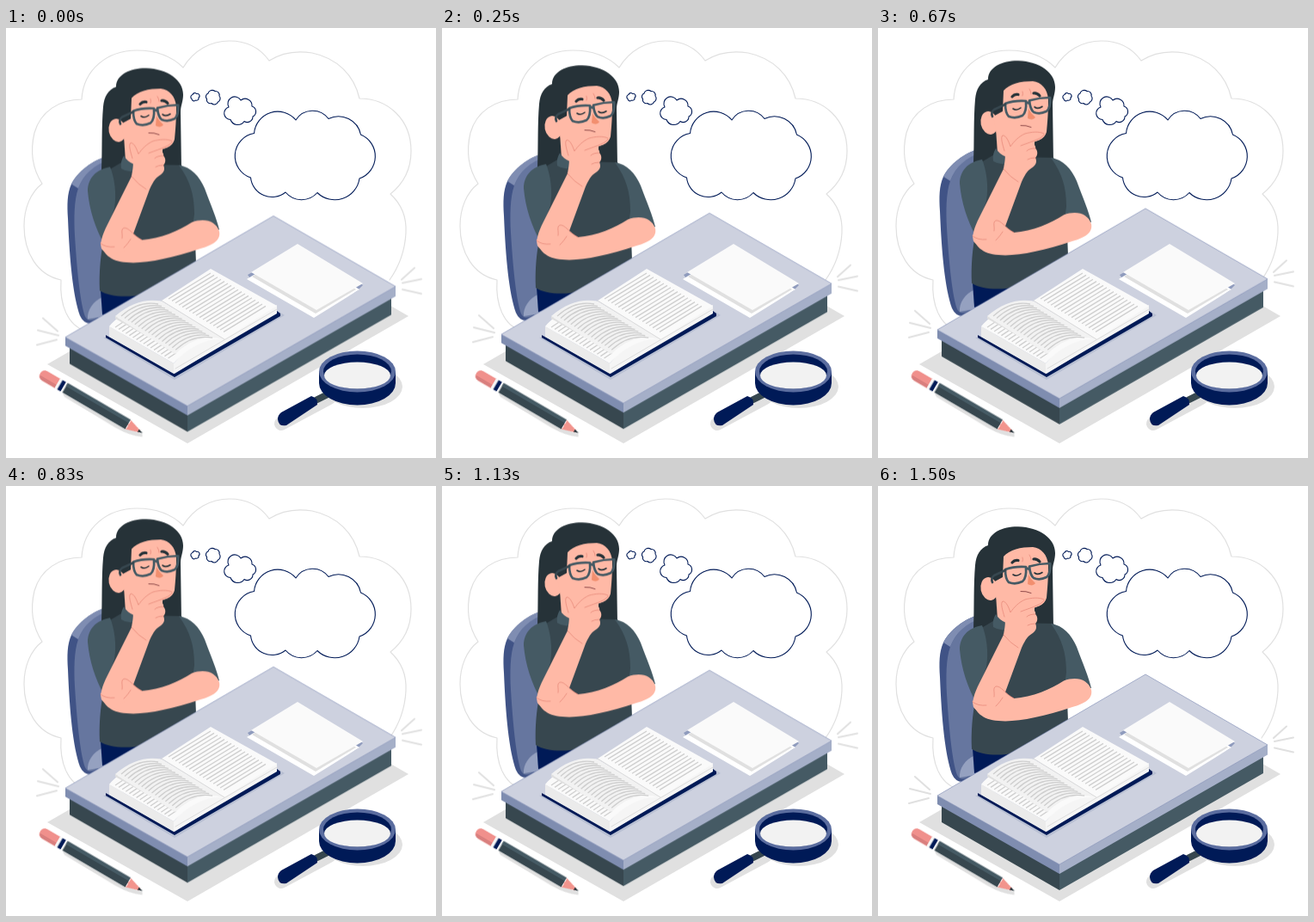
These frames come from a looping animation (500x500 px, 1.54 s). An HTML page:

```html
<!DOCTYPE html>
<html lang="en">
<head>
<meta charset="utf-8">
<title>Thinking at the desk</title>
<style>
  html, body { margin: 0; width: 100%; height: 100%; overflow: hidden; background: #fff; }
  svg { display: block; width: 100%; height: 100%; }
  .float { animation: float 1540ms linear -40ms infinite; }
  @keyframes float {
    50% { transform: translateY(-10px); }
  }
  .line { fill: none; stroke-linecap: round; stroke-linejoin: round; }
  .skin { fill: #ffb9a6; }
  .crease { stroke: #e88b7b; stroke-width: .8; }
  .hair { fill: #263238; }
  .shirt { fill: #37474f; }
  .sleeve { fill: #455a64; }
  .navy { fill: #001a57; }
  .shade { fill: #e0e0e0; }
  .bubble { fill: #fff; stroke: #001a57; stroke-width: 1.1; stroke-linejoin: round; }
  .text { fill: none; stroke: #cfcfcf; stroke-width: 1.3; }
</style>
</head>
<body>
<svg viewBox="0 0 500 500">
  <!-- backdrop -->
  <path class="line" stroke="#e0e0e0" stroke-width="1.2" d="M92 352C72 346 62 322 64 293C36 287 21 261 21 230C21 209 29 191 42 181C31 164 28 143 33 122C40 97 62 83 88 83C90 48 118 26 152 26C174 26 193 33 206 46C218 26 238 15 260 15C280 15 296 24 306 38C320 29 338 26 356 29C385 35 405 55 411 82C445 82 471 107 471 143C471 164 462 181 447 193C460 205 466 220 465 238C464 258 458 276 446 293"/>
  <path class="shade" d="M48 391L211 483L468 335L307 242Z"/>

  <!-- thoughts -->
  <path class="bubble" d="M288.500 122.500A27.500 27.500 0 0 1 337 107A23 23 0 0 1 375 105.500A26.500 26.500 0 0 1 412.500 124A27.300 27.300 0 0 1 411 175A29 29 0 0 1 362 191.500A24.500 24.500 0 0 1 325 191A25 25 0 0 1 284.500 174A26.600 26.600 0 0 1 288.500 122.500Z"/>
  <path class="bubble" d="M259 92A8 8 0 0 1 273 84A8 8 0 0 1 286 91A6.500 6.500 0 0 1 287 103A6.500 6.500 0 0 1 277 108.500A9 9 0 0 1 261 106.500A7.400 7.400 0 0 1 259 92Z"/>
  <path class="bubble" d="M235 76A5 5 0 0 1 243 73.500A4.500 4.500 0 0 1 248 79A4.500 4.500 0 0 1 246.500 86A4.500 4.500 0 0 1 239 87.500A4.200 4.200 0 0 1 233.500 82.500A4 4 0 0 1 235 76Z"/>
  <path class="bubble" d="M217 77.500A2.600 2.600 0 0 1 221.500 76.500A2.600 2.600 0 0 1 224 81A2.600 2.600 0 0 1 220.500 84A2.600 2.600 0 0 1 216 82.500A2.800 2.800 0 0 1 217 77.500Z"/>

  <g class="float">
    <g class="line" stroke="#e0e0e0" stroke-width="2">
      <path d="M43 338L60 353M37 352L61 358M36 369L59 363"/>
      <path d="M475 279.500L460 293M483 292.500L461 297M483 309.500L461 304.500"/>
    </g>

    <!-- chair -->
    <path fill="#405386" d="M120 149C100 154 83 168 76 182C71 193 71 206 72 222C74 272 78 312 86 335Q90 344 98 344L120 330Z"/>
    <path fill="#66769f" d="M120 153C103 159 90 171 84 187C79 201 79 222 80 242C83 290 87 322 92 336Q96 344 105 338L120 330Z"/>
    <path fill="#7f8db2" d="M120 149C100 154 83 168 76 182L84 187C90 171 103 159 120 154Z"/>
    <path fill="#95a1c0" d="M113 313C101 318 94 329 95 339L113 336Z"/>

    <!-- hair and neck -->
    <path class="hair" d="M111 167C112 140 111 115 113 92C114 80 119 72 128 69C128 54 146 47 163 47.300C188 48 206 61 206 78C206 86 203 91 203 98L204 166Z"/>
    <path class="skin" d="M137 126L139 155L158 168L182 150V130Z"/>

    <!-- body -->
    <path class="navy" d="M110 305L112 334L180 315V300Z"/>
    <path class="shirt" d="M134 157Q142 163 152 159L204 160L226 190V224L219 222L221 274L171 303C166 313 126 317 109 306C108 285 110 265 113 250L112 170Z"/>
    <path class="sleeve" d="M121 162C104 165 95 176 95 190C97 213 104 233 114 252L119 231L126 210C129 193 126 174 121 162Z"/>
    <path class="sleeve" d="M201 160C215 162 225 173 231 187C238 206 245 222 248 235L238 236L217 232L219 217C219 194 214 178 201 160Z"/>
    <path class="sleeve" d="M137 149C134 154 133 159 134 164Q140 168 147 167L149 159Q141 156 137 149Z"/>

    <!-- face -->
    <ellipse class="skin" cx="129.500" cy="119.500" rx="10" ry="13.500" transform="rotate(-12 129.500 119.500)"/>
    <path class="skin" d="M146 82C153 74 166 71 180 71C190 72 197 80 198 92C198 108 197 120 196 130C194 139 183 142 172 142C160 144 148 141 138 132L134 112L145 106Z"/>
    <path fill="#f28f6f" d="M175 103C177 107 180 110 183 113C181 116 177 116 174 114Z"/>
    <path class="line" stroke="#263238" stroke-width="3.200" d="M156 89Q159 85.500 163 86.500M181 85Q185 84.500 188 88"/>
    <path class="line crease" d="M168 83Q169 86 168 88M176 80Q178 83 178 86"/>
    <path class="line" stroke="#263238" stroke-width="1.600" d="M157 103Q161 106 166 102M182 101Q186 104 191 100.500"/>
    <path class="line" stroke="#8f4a4a" d="M166 122.500Q172 122 178 124.500"/>
    <g class="line" stroke="#455a64" stroke-width="2.700">
      <path d="M148 97Q159 93 172 94Q173 107 168 111Q160 115 152 112Q148 108 148 97ZM176 93.500Q188 90 200 90Q201 102 196 106Q188 110 181 107Q177 104 176 93.500ZM172 97Q174 95 176 97"/>
      <path stroke="#37474f" d="M148 98L135 104Q131 107 133 112"/>
    </g>

    <!-- arms -->
    <path class="skin" d="M216 226.500C231 221 244 225 248 237C250 247 241 253 226 257C190 269 160 275 140 273C121 272 112 262 110 250L136 233C141 231 147 241 158 247C180 245 200 237 216 226.500Z"/>
    <path class="skin" d="M146 173L118 229C112 241 109 250 111 257C117 266 134 265 142 256L167 188C172 177 175 174 180 171C184 168 185 164 183 160C186 157 186 152 183 149C184 146 181 144 178 143C188 140 195 136 193 132C190 129 180 130 172 131C164 134 157 141 154 147C152 141 149 134 145 134C142 136 145 145 147 152C149 159 147 166 146 173Z"/>
    <path class="line crease" d="M193 132C188 129 178 130 171 132C164 135 158 141 154 147C152 141 149 134 145 134C142 136 145 145 147 152M193 133C190 138 182 140 166 146M183 149Q176 149 173 152M183 160Q177 160 174 162M146 173Q154 183 163 188"/>
    <path class="line crease" d="M110 251Q116 256 126 255M137 256C141 252 143 249 145 246M135 245C136 240 133 235 137 233C143 232 148 242 158 247"/>

    <!-- desk -->
    <path class="shirt" d="M74 371L211 449V470L74 391Z"/>
    <path class="sleeve" d="M211 449L448 313V334L211 470Z"/>
    <path fill="#7f8db0" d="M69 360L211 440V451L69 370Z"/>
    <path fill="#a5afc8" d="M211 440L453 301V312.500L211 451Z"/>
    <path fill="#cdd1df" stroke="#7b89b2" stroke-width=".6" d="M69 360L311 219L453 301L211 440Z"/>
  </g>

  <!-- papers -->
  <path fill="#8f9bbd" d="M281 287L340 253L415 299L408 306L361 332L284 291Z"/>
  <path fill="#fff" d="M280 292L336 258L411 304L358 337Z"/>
  <path class="shade" d="M286 289L340 256L407 304L360 332Z"/>
  <path fill="#fafafa" d="M339 251L415 297L361 328L285 284Z"/>

  <!-- book -->
  <path fill="#b8bfd2" d="M113 360L196 409L324 334L314 328Z"/>
  <path class="navy" d="M116 357L196 402L315 329L319 332V335L196 406L116 360Z"/>
  <path fill="#ebebeb" d="M120 347L195 390V402L120 359Z"/>
  <path fill="#f5f5f5" d="M195 390L225 355L254 361L315 322V332L195 402Z"/>
  <path fill="#fafafa" d="M120 347C135 330 160 315 181 318L254 362C232 360 210 373 195 390Z"/>
  <path class="text" id="under"/>
  <path class="shade" d="M127 335L198 380Q192 374 127 338Z"/>
  <path fill="#f2f2f2" d="M127 335C145 319 165 314 181 318L254 362C235 357 215 361 197 379Z"/>
  <path fill="#fafafa" d="M181 317L238 280L315 323L254 362Z"/>
  <path class="line" stroke="#dcdcdc" d="M181 317L254 362M197 396L315 327"/>
  <path class="text" id="left"/>
  <path class="text" id="right"/>

  <!-- magnifier -->
  <path class="line" stroke="#e0e0e0" stroke-width="16" d="M320 460L376 430"/>
  <ellipse class="shade" cx="415" cy="417" rx="46" ry="25"/>
  <path class="line" stroke="#37474f" stroke-width="8" d="M362 432L376 425"/>
  <path class="navy" d="M320 447L355 428Q363 430 362 438L326 462Q317 464 316 455Q316 450 320 447Z"/>
  <path class="navy" d="M364 400V413A44.500 25.500 0 0 0 453 413V400Z"/>
  <ellipse fill="#5b6d9f" cx="408.500" cy="399.500" rx="44.500" ry="24"/>
  <ellipse class="navy" cx="408.500" cy="399.500" rx="39.500" ry="20"/>
  <ellipse fill="#f2f2f2" cx="408.500" cy="404" rx="38.500" ry="15.500"/>

  <!-- pencil -->
  <g transform="translate(45 404.500) rotate(30.300)">
    <path class="shade" d="M26 5H112L132 1L134 4Q118 11 100 10.500L32 9.500Z"/>
    <path fill="#f0908c" d="M18 -6.300H0Q-6 -6 -6 0T0 6.300H18Z"/>
    <path fill="#d97f7e" d="M18 2H-5Q-4 6 0 6.300H18Z"/>
    <path fill="#f5f5f5" d="M17 -6.300H28V6.300H17Z"/>
    <path class="navy" d="M20.500 -6.300H25V6.300H20.500Z"/>
    <path class="shirt" d="M27.500 -6.300H112V6.300H27.500Z"/>
    <path class="sleeve" d="M27.500 -6.300H112V-2H27.500Z"/>
    <path fill="#f2948d" d="M112 -6.300L128 -1.200V1.200L112 6.300Q114 3 112 0Q114 -3 112 -6.300Z"/>
    <path class="hair" d="M126 -1.800L132 0L126 1.800Z"/>
  </g>
</svg>
<script>
  // Repeats one line of text n times, shifted by (dx, dy) each time.
  const rows = (id, n, x, y, dx, dy, shape) => {
    let d = '';
    for (let i = 0; i < n; i++) d += `M${x + dx * i} ${y + dy * i}${shape}`;
    document.getElementById(id).setAttribute('d', d);
  };
  rows('right', 17, 189, 315, 4, 2.4, 'l49 -30');
  rows('left', 17, 134, 335, 3.95, 2.45, 'c13 -12 28 -17 43 -14');
  rows('under', 16, 127, 348, 4.1, 2.4, 'l9 -6');
</script>
</body>
</html>
```
